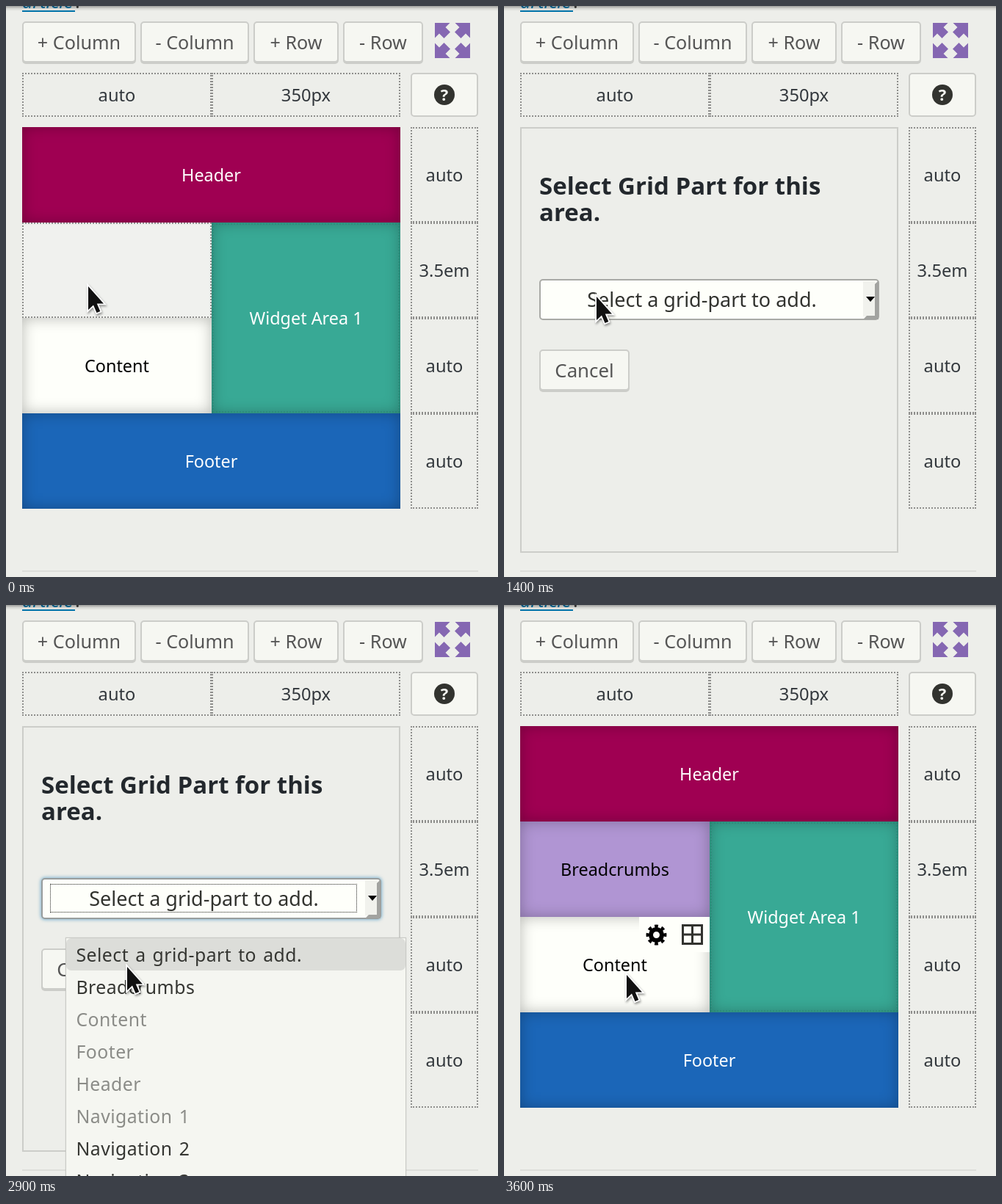
An HTML page for the animation above (5.3 s loop, 670 px wide and 778 px high).

```html
<!DOCTYPE html>
<html lang="en">
<head>
<meta charset="utf-8">
<title>Grid editor</title>
<style>
html, body { margin: 0; width: 100%; height: 100%; overflow: hidden; background: #edeeea; }
body { position: relative; font-family: "Noto Sans", "Open Sans", sans-serif; color: #32373c; }
div { position: absolute; box-sizing: border-box; white-space: pre; }
svg { position: absolute; left: 0; top: 0; overflow: hidden; }
.btn, .track, .area { display: flex; align-items: center; justify-content: center; }
.btn { border: 2px solid #cccdc9; border-radius: 5px; background: #f6f7f2; color: #555; font-size: 25.2px; }
.raised { box-shadow: 0 2px 0 #cccdc9; }
.track { border: 2px dotted #8e8e8c; font-size: 23.7px; }
.area { font-size: 23.4px; color: #fff; box-shadow: inset 0 0 20px rgba(0,0,0,.28); }
.dark { color: #000; }
.panel { border: 2px solid #cccdc9; }
.head { font: bold 33px/36px "Noto Sans", "Open Sans", sans-serif; color: #23282d; }
.select { border: 2px solid #a9aaa6; border-radius: 5px; background: #fefffa; }
.select.focus { border-color: #999d9d; box-shadow: 0 0 4px 1px rgba(70,150,195,.65); }
.value { font-size: 27px; line-height: 56px; text-align: center; color: #32332f; }
.ring { border: 1px dotted #222; }
.list { background: #f5f6f1; border: 1px solid #c9cac6; box-shadow: 0 0 1px rgba(0,0,0,.2); }
.mark { background: #dcddd9; border-radius: 7px; }
.item { font-size: 24.8px; line-height: 44px; letter-spacing: .45px; word-spacing: 2.2px; color: #353632; }
.off { color: #8b8c88; }
</style>
</head>
<body>
<script>
const NS = "http://www.w3.org/2000/svg";

function box(parent, cls, x, y, w, h, text = "", bg = "") {
  const el = document.createElement("div");
  el.className = cls;
  el.style.cssText = `left:${x}px;top:${y}px;width:${w}px;height:${h}px`;
  if (bg) el.style.background = bg;
  el.textContent = text;
  parent.append(el);
  return el;
}

function art(parent, markup) {
  const el = document.createElementNS(NS, "svg");
  el.setAttribute("width", 670);
  el.setAttribute("height", 778);
  el.innerHTML = markup;
  parent.append(el);
  return el;
}

const layer = () => box(document.body, "", 0, 0, 670, 778);
const show = (el, on) => { el.style.display = on ? "" : "none"; };

// Toolbar, tracks and page edges
const base = layer();
[["+ Column", 22, 155], ["- Column", 183, 148], ["+ Row", 337, 116], ["- Row", 459, 109]]
  .forEach(([label, x, w]) => box(base, "btn raised", x, 21, w, 56, label));
box(base, "track", 22, 91, 258, 60, "auto");
box(base, "track", 280, 91, 257, 60, "350px");
["auto", "3.5em", "auto", "auto"].forEach((s, i) => box(base, "track", 551, 165 + 130 * i, 92, 130, s));
box(base, "btn", 551, 91, 92, 60);
box(base, "", 22, 769, 621, 2, "", "#dddeda");

const arrow = '<path d="M-24-24h20.5l-6 6 6.5 6.5-8.5 8.5-6.5-6.5-6 6z" ';
art(base, `
  <g transform="translate(608 47)" fill="#8567b2">
    ${[0, 90, 180, 270].map(a => arrow + `transform="rotate(${a})"/>`).join("")}
  </g>
  <circle cx="597" cy="121" r="14" fill="#32332f"/>
  <text x="597" y="129" text-anchor="middle" font-size="22" font-weight="700" fill="#f6f7f2">?</text>
  <text x="22" y="3" font-size="25" fill="#0073aa"><tspan font-style="italic">article</tspan><tspan x="94" fill="#444">.</tspan></text>
  <path d="M22 7H94" stroke="#0073aa" stroke-width="2"/>`);
box(base, "", 0, 0, 670, 7, "", "linear-gradient(rgba(0,0,0,.34), rgba(0,0,0,.1) 50%, transparent)");

// Layout view
const grid = layer();
box(grid, "area", 22, 165, 515, 130, "Header", "#9f0052");
const widget = box(grid, "area", 280, 295, 257, 260, "Widget Area 1", "#38a995");
widget.style.outline = "2px dotted rgba(0,0,0,.06)";
widget.style.outlineOffset = "-3px";
box(grid, "area dark", 22, 425, 258, 130, "Content", "#fefffa");
box(grid, "area", 22, 555, 515, 130, "Footer", "#1b66b8");
const empty = box(grid, "track", 22, 295, 258, 130, "", "#f0f1ee");
const added = box(grid, "", 0, 0, 670, 778);
box(added, "area dark", 22, 295, 258, 130, "Breadcrumbs", "#b095d3");
box(added, "", 184, 425, 96, 48, "", "#fefffa");
art(added, `
  <g transform="translate(207.5 449.5)" fill="none" stroke="#000">
    <circle r="7.5" stroke-width="6"/>
    <circle r="11.5" stroke-width="5" pathLength="16" stroke-dasharray="1 1" transform="rotate(-11.25)"/>
  </g>
  <path d="M243.5 436.5h26v25h-26zM256.5 436v26M243 449h27" fill="none" stroke="#32332f" stroke-width="3"/>`);

// Part picker
const picker = layer();
box(picker, "panel", 22, 165, 515, 580);
box(picker, "head", 48, 227, 460, 72, "Select Grid Part for this\narea.");
const select = box(picker, "select", 48, 372, 463, 56);
box(picker, "value", 60, 372, 419, 56, "Select a grid-part to add.");
const ring = box(picker, "ring", 60, 380, 418, 39);
art(picker, `
  <path d="M489 375h17v48h-17z" fill="#f1f2ed"/>
  <path d="M489 427l5-5h11v-43l5-5v53z" fill="#a2a3a0"/>
  <path d="M493 396h12l-6 7z"/>`);
box(picker, "btn raised", 48, 468, 123, 56, "Cancel").style.fontSize = "25.8px";

// Open list
const list = layer();
box(list, "list", 81, 453, 464, 340);
const mark = box(list, "mark", 82, 454, 462, 44);
["Select a grid-part to add.", "Breadcrumbs", "Content", "Footer", "Header",
  "Navigation 1", "Navigation 2", "Navigation 3"]
  .forEach((s, i) => box(list, i > 1 && i < 6 ? "item off" : "item", 95.5, 454 + 44 * i, 440, 44, s));

// Pointer
const pointer = art(document.body, `
  <g style="filter:drop-shadow(1px 2px 1.5px rgba(0,0,0,.4))">
    <path d="M0 1V33l7-6.5 4.5 10.5 4.8-2-4.5-10.5H21z" fill="#111" stroke="#fff" stroke-width="3.6" paint-order="stroke"/>
  </g>`).firstElementChild;

const LOOP = 5300;
// time, x, y of the pointer tip
const path = [
  [0, 112, 381], [1100, 121, 390], [1300, 123, 393], [1400, 126, 395],
  [2400, 139, 418], [2600, 148, 440], [2700, 155, 460], [2800, 161, 478],
  [2900, 165, 492], [3000, 166, 499], [3100, 167, 503]
];

function render(ms) {
  const t = ms % LOOP;
  const [, x, y] = path.filter(p => p[0] <= t).pop();
  const picking = t >= 700 && t < 3600;
  const open = t >= 2000 && t < 3600;
  show(grid, !picking);
  show(empty, t < 700);
  show(added, t >= 3600);
  show(picker, picking);
  show(list, open);
  show(ring, open);
  select.classList.toggle("focus", open);
  mark.style.top = (y >= 498 ? 498 : 454) + "px";
  pointer.setAttribute("transform", `translate(${x} ${y})`);
}

const start = performance.now();
function tick() {
  render(performance.now() - start);
  requestAnimationFrame(tick);
}
tick();
</script>
</body>
</html>
```
